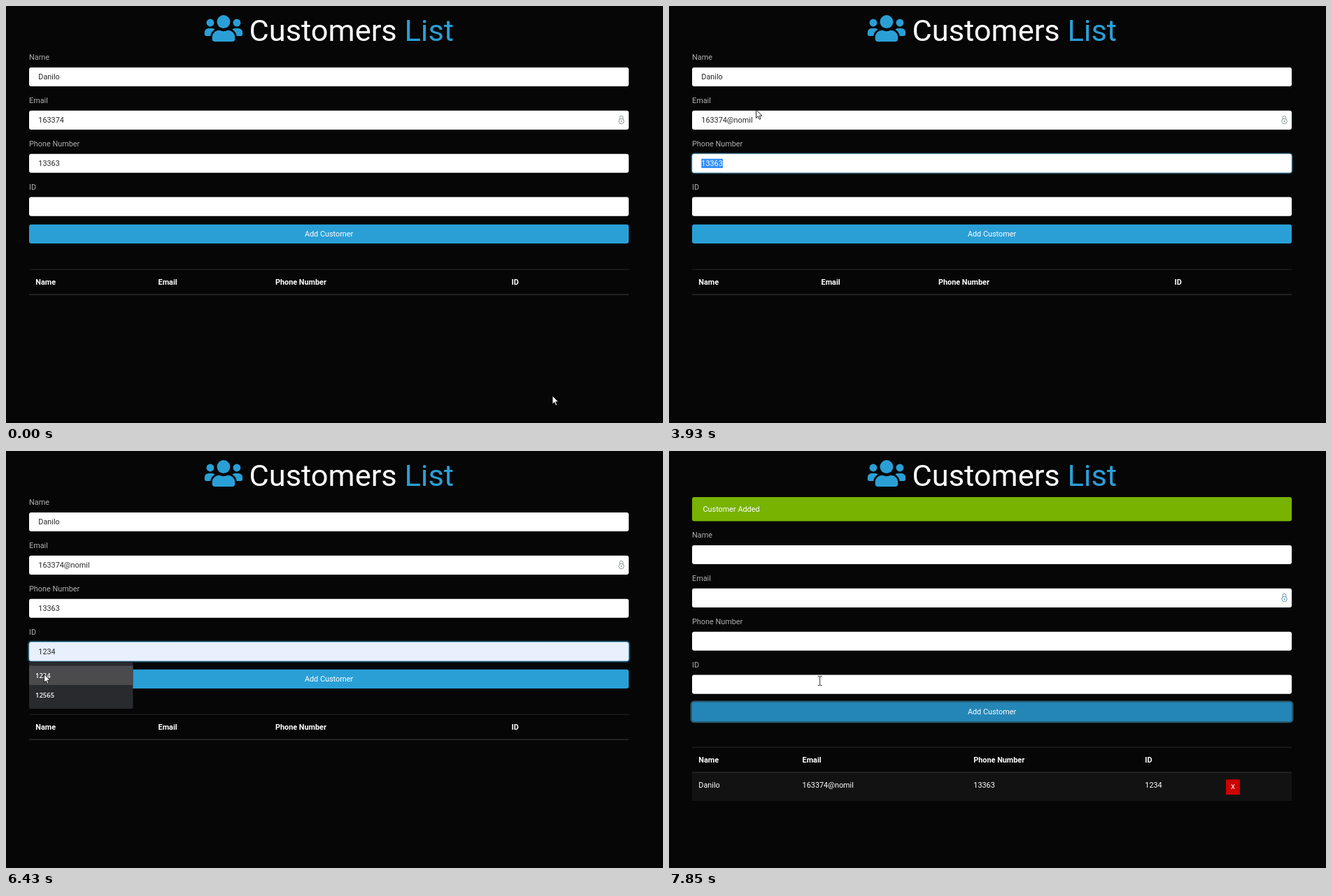
An HTML page for the animation above (8 s loop, 939 by 597 pixels).

```html
<!DOCTYPE html>
<html lang="en">
<head>
<meta charset="utf-8">
<title>Customers List</title>
<style>
html, body { margin: 0; width: 100%; height: 100%; overflow: hidden; background: #060606; }
svg { display: block; width: 939px; height: 597px; font: 10.85px Roboto, sans-serif; fill: #fff; }
.title { font-size: 43.4px; }
.blue { fill: #2a9fd6; }
.label { fill: #adafae; }
.value { fill: #282828; }
.head { font-weight: 700; }
.rule { fill: #282828; }
.menu { font: 600 9.5px "Open Sans", sans-serif; }
</style>
</head>
<body>
<svg id="stage" viewBox="0 0 939 597" xmlns="http://www.w3.org/2000/svg">
  <defs>
    <g id="side">
      <circle cx="96" cy="160" r="64"/>
      <path d="M173 275C161 263 146 256 128 256H64a64 64 0 0 0-64 64v32a32 32 0 0 0 32 32h66c6-47 35-87 75-109z"/>
    </g>
  </defs>
  <rect width="939" height="597" fill="#060606"/>
  <g class="blue" transform="translate(283.8 10.4) scale(.0848)">
    <use href="#side"/>
    <use href="#side" transform="translate(640) scale(-1 1)"/>
    <circle cx="320" cy="144" r="112"/>
    <path d="M128 403a115 115 0 0 1 115-115h8q69 32 138 0h8a115 115 0 0 1 115 115v29a48 48 0 0 1-48 48H176a48 48 0 0 1-48-48z"/>
  </g>
  <text class="title" x="347.5" y="49.5">Customers <tspan class="blue">List</tspan></text>

  <g id="alert">
    <rect x="33" y="66" width="857" height="34.5" rx="3" fill="#77b300"/>
    <text x="48.5" y="86.5">Customer Added</text>
  </g>

  <g id="form">
    <g id="fields"></g>
    <g id="lock" fill="none" stroke="#8b9696" stroke-width="1">
      <path d="M877.2 162v-2.4a2.3 2.3 0 0 1 4.6 0v2.4"/>
      <circle cx="879.5" cy="165" r="3.7"/>
      <path d="M879.5 163.8v2.4" stroke-width="1.5"/>
    </g>
    <rect id="glow" fill="#4aaddc"/>
    <rect id="button" x="33" y="312.8" width="857" height="27.1" rx="3"/>
    <text x="461.5" y="330" text-anchor="middle">Add Customer</text>
    <rect class="rule" x="33" y="376.7" width="857" height="1"/>
    <g id="heads" class="head"></g>
    <rect class="rule" x="33" y="412.3" width="857" height="1.6"/>
  </g>

  <g id="entry">
    <rect x="33" y="461" width="857" height="40" fill="#121212"/>
    <g id="cells"></g>
    <rect x="796" y="470.3" width="20" height="21.7" fill="#c00"/>
    <text x="806" y="484.3" text-anchor="middle" font-size="9.5">X</text>
  </g>

  <g id="menu" class="menu">
    <rect x="33" y="302" width="148.5" height="67" rx="2" fill="#292a2d"/>
    <rect id="hover" x="33" y="307.5" width="148.5" height="27.5" fill="#4b4b4d"/>
    <text x="42" y="325.3">1234</text>
    <text x="42" y="353.2">12565</text>
  </g>

  <g id="cursor">
    <path id="arrow" d="M0 0V12l2.8-2.6 1.9 4.4 1.9-.8-1.9-4.3H8.5z" stroke="#111" stroke-width=".9"/>
    <path id="beam" d="M-3-6.5h2L0-6l1-.5h2M-3 6.5h2L0 6l1 .5h2M0-6V6" fill="none" stroke="#333"/>
    <g id="hand" stroke="#111" stroke-width=".9">
      <path d="M-1.4 1.4a1.4 1.4 0 0 1 2.8 0v4.2q2.1-.4 2.5.9 1.9-.3 2.2 1 1.5 0 1.5 1.6v3.2q0 1.8-1.2 3v2.2H-.8v-1.8L-4.7 10.500q-.9-1.600.5-2.200 1.300-.2 2.800 1.800z"/>
      <path d="M1.400 5.600v3M3.900 6.500v2.500M6.100 7.500v2" fill="none"/>
    </g>
    <circle id="click" r="9.500" fill="#afce27" opacity=".75"/>
  </g>
</svg>
<script>
const LOOP = 8000;
const NS = 'http://www.w3.org/2000/svg';
const $ = id => document.getElementById(id);
const ADDED = 7770, PRESS = 7290, HOVER = 6120;
const NAME = 'Danilo', MAIL = '163374@nomil', PHONE = '13363', ID = '1234';

function add(parent, tag, attrs, text) {
  const el = document.createElementNS(NS, tag);
  set(el, attrs);
  if (text) el.textContent = text;
  return parent.appendChild(el);
}
function set(el, attrs) {
  for (const k in attrs) el.setAttribute(k, attrs[k]);
}
const show = (el, on) => el.style.display = on ? '' : 'none';
const within = (t, a, b) => t >= a && t < b;

// Last row of a time table that has been reached.
const at = (table, t) => table.reduce((hit, row) => row[0] <= t ? row : hit);

const fields = ['Name', 'Email', 'Phone Number', 'ID'].map((label, i) => {
  const y = 88 + 61.85 * i, g = $('fields');
  add(g, 'text', { class: 'label', x: 33, y: y - 11 }, label);
  const ring = add(g, 'rect', { fill: '#2a9fd6' });
  const box = add(g, 'rect', { x: 33, y, width: 857, height: 27.1, rx: 3 });
  const mark = add(g, 'rect', { x: 46.3, y: y + 7, width: 30.7, height: 13.3, fill: '#3390ff' });
  const text = add(g, 'text', { class: 'value', x: 46.3, y: y + 17.3 });
  const caret = add(g, 'rect', { y: y + 7, width: 1, height: 13.3, fill: '#222' });
  return { y, ring, box, mark, text, caret };
});
const heads = ['Name', 'Email', 'Phone Number', 'ID'].map(s => add($('heads'), 'text', { y: 398.6 }, s));
const WIDE = [42.3, 217.6, 385, 722.6];
const FILLED = [42.3, 190.6, 435.3, 680.3];
[NAME, MAIL, PHONE, ID].forEach((s, i) => add($('cells'), 'text', { x: FILLED[i], y: 482 }, s));

// [time, letters of the mail address]
const typing = [[0, 6], [1990, 7], [2690, 8], [2840, 9], [3070, 10], [3150, 11], [3300, 12]];

// [time, shape, x, y]
const moves = [
  [0, 'arrow', 781, 558], [70, 'beam', 100, 276], [150, ''],
  [380, 'beam', 128, 162], [900, 'arrow', 124.5, 148.5],
  [4170, 'arrow', 122, 148], [4250, 'arrow', 120.5, 147.5],
  [5740, 'beam', 55.5, 287], [5890, 'beam', 44, 293], [5970, 'arrow', 24, 310],
  [6050, 'arrow', 32, 314], [6120, 'arrow', 40, 317], [6200, 'arrow', 47, 318],
  [6280, 'arrow', 52, 319], [6350, 'arrow', 54.5, 319.5],
  [6740, 'hand', 62, 321], [6820, 'hand', 86, 322], [6900, 'hand', 118, 324],
  [6980, 'hand', 152, 326], [7060, 'hand', 182, 327], [7130, 'hand', 203, 328],
  [7210, 'hand', 214.3, 328.6], [7850, 'beam', 215.7, 329]
];

// Focus span per field, carets and their visible spans.
const focus = [null, [530, 3820], [3820, 4320], [4320, PRESS]];
const blink = [
  [1, 680, 1200], [1, 1680, 2540], [1, 2690, 3820],
  [3, 4320, 4870], [3, 5190, 5890], [3, 6670, 7210]
];

function ease(t, start, span) {
  const p = Math.min(1, Math.max(0, (t - start) / span));
  return p * p * (3 - 2 * p);
}

function outline(el, y, p, size, alpha) {
  const s = size * p;
  set(el, { x: 33 - s, y: y - s, width: 857 + 2 * s, height: 27.1 + 2 * s, rx: 3 + s, opacity: alpha * p });
}

function render(t) {
  const added = t >= ADDED, preview = t >= HOVER && !added;
  const values = added ? ['', '', '', ''] :
    [NAME, MAIL.slice(0, at(typing, t)[1]), PHONE, preview ? ID : ''];

  fields.forEach((f, i) => {
    const span = focus[i];
    const p = span ? ease(t, span[0], 150) * (1 - ease(t, span[1], 110)) : 0;
    const marked = i === 2 && within(t, 3830, 4320);
    outline(f.ring, f.y, p, 2.4, .3);
    set(f.box, {
      fill: i === 3 && preview ? '#e8f0fe' : '#fff',
      stroke: '#95cfeb', 'stroke-width': .8, 'stroke-opacity': p
    });
    f.text.textContent = values[i];
    f.text.style.fill = marked ? '#fff' : '';
    show(f.mark, marked);
    const lit = blink.some(b => b[0] === i && within(t, b[1], b[2]));
    show(f.caret, lit);
    if (lit) set(f.caret, { x: 46.3 + (values[i] ? f.text.getComputedTextLength() : 0) });
  });

  set($('form'), { transform: `translate(0 ${added ? 47 : 0})` });
  heads.forEach((h, i) => set(h, { x: (added ? FILLED : WIDE)[i] }));
  set($('lock'), { stroke: added ? '#5e93ad' : '#8b9696' });
  show($('alert'), added);
  show($('entry'), added);

  outline($('glow'), 312.8, ease(t, PRESS, 150), 2.4, .5);
  const dark = ease(t, 6720, 150);
  const mix = (a, b) => Math.round(a + (b - a) * dark);
  set($('button'), { fill: `rgb(${mix(42, 36)},${mix(159, 134)},${mix(214, 182)})` });

  show($('menu'), within(t, 5190, 6670));
  show($('hover'), t >= HOVER);

  const [, shape, x = 0, y = 0] = at(moves, t);
  for (const id of ['arrow', 'beam', 'hand']) show($(id), id === shape);
  show($('click'), within(t, 530, 750) || within(t, 6510, 6670) || within(t, PRESS, ADDED));
  set($('cursor'), { transform: `translate(${x} ${y})` });
}

const begin = performance.now();
function tick() {
  render((performance.now() - begin) % LOOP);
  requestAnimationFrame(tick);
}
tick();
</script>
</body>
</html>
```
